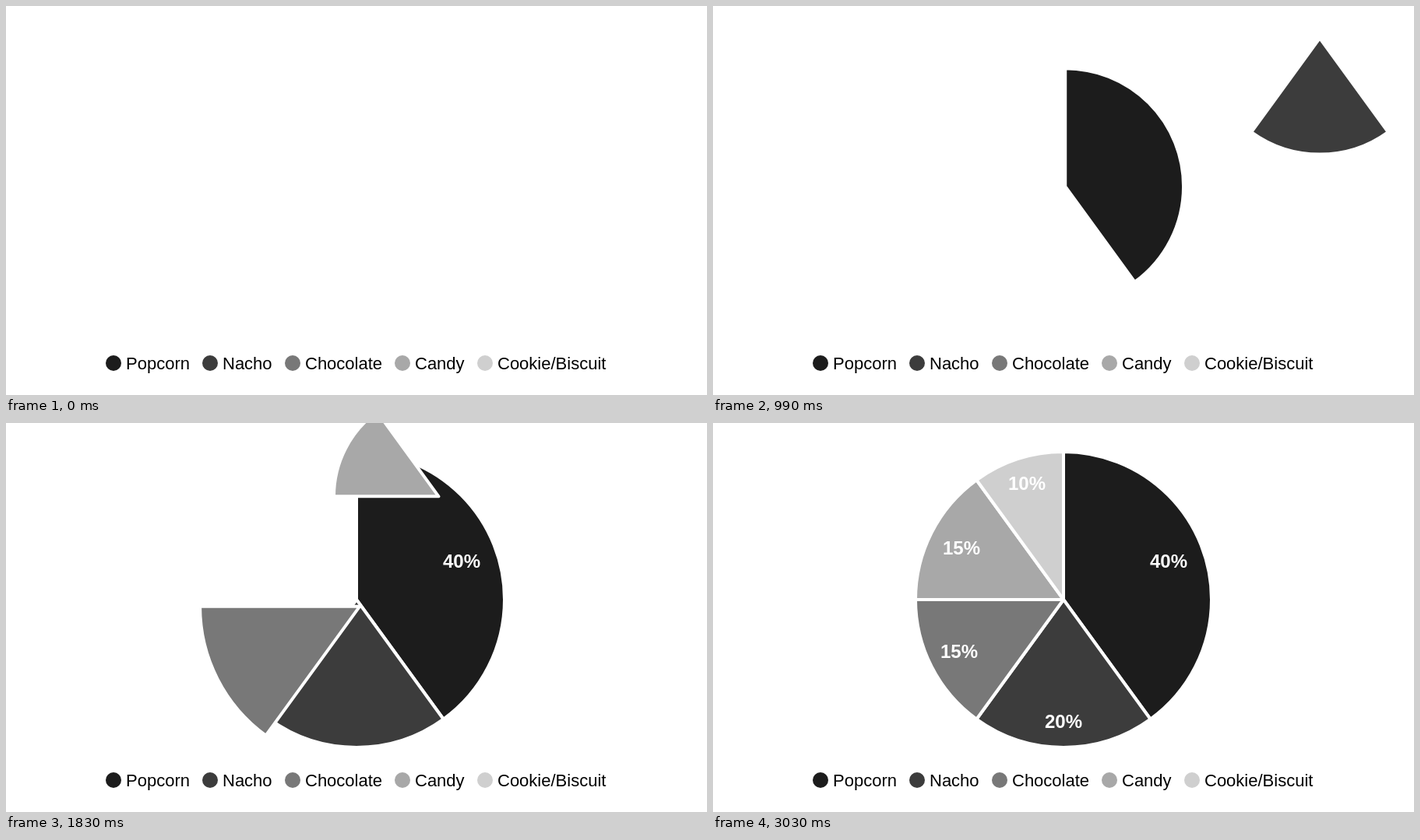
An HTML page with a canvas that plays this animation: 900 px wide and 500 px high, repeating every 5670 ms.

```html
<!DOCTYPE html>
<html lang="en">
<head>
<meta charset="utf-8">
<title>Snack shares</title>
<style>
  html, body { margin: 0; width: 100%; height: 100%; overflow: hidden; background: #fff; }
  canvas { display: block; width: 900px; height: 500px; }
</style>
</head>
<body>
<canvas id="stage" width="900" height="500"></canvas>
<script>
const ctx = document.getElementById('stage').getContext('2d');
const LOOP = 5670, STEP = 30;
const CX = 450, CY = 227, RADIUS = 190;
const FIRST = 570, STAGGER = 345;
const FLIGHT = 420, DIP_AT = 300, SETTLE = 180;
const FONT = '"Liberation Sans", Arial, sans-serif';

// peak: ms after entry when a slice is largest; top: its scale then
const slices = [
  { name: 'Popcorn', share: 40, color: '#1c1c1c', peak: 820, top: 1, label: { x: 585, y: 177, at: 1320 } },
  { name: 'Nacho', share: 20, color: '#3c3c3c', peak: 735, top: 1.1, label: { x: 450, y: 383, at: 1890 } },
  { name: 'Chocolate', share: 15, color: '#787878', peak: 620, top: 1.1, label: { x: 316, y: 293, at: 2040 } },
  { name: 'Candy', share: 15, color: '#a8a8a8', peak: 565, top: 1.1, label: { x: 319, y: 160, at: 2300 } },
  { name: 'Cookie/Biscuit', share: 10, color: '#cfcfcf', peak: 680, top: 1.1, label: { x: 403, y: 77, at: 2490 } }
];

let turn = 0;
slices.forEach((s, i) => {
  s.start = FIRST + i * STAGGER;
  s.dip = 0.77 - 0.0085 * i * i;
  s.from = turn * Math.PI / 50 - Math.PI / 2;
  turn += s.share;
  s.to = turn * Math.PI / 50 - Math.PI / 2;
});

const clamp = p => Math.min(1, Math.max(0, p));

// Cosine ease from a to b while t runs from t0 to t1
function ease(a, b, t, t0, t1) {
  const p = clamp((t - t0) / (t1 - t0));
  return a + (b - a) * (1 - Math.cos(Math.PI * p)) / 2;
}

// A curved dive from the top right, with a small overshoot on arrival
function tip(age) {
  const far = (1 - clamp(age / FLIGHT) ** 1.4) ** 2.55;
  const over = Math.sin(Math.PI * clamp((age - 380) / 270));
  return [
    CX + 418 * far + 5 * over,
    CY - 186 * (1 - (1 - far) ** 4.3) + 11 * over
  ];
}

function zoom(s, age) {
  if (age < DIP_AT) return ease(0.79, s.dip, age, 0, DIP_AT);
  if (age < s.peak) return ease(s.dip, s.top, age, DIP_AT, s.peak);
  return ease(s.top, 1, age, s.peak, s.peak + SETTLE);
}

function drawSlice(s, t) {
  const age = t - s.start;
  if (age < 0) return;
  const [x, y] = tip(age);
  ctx.beginPath();
  ctx.moveTo(x, y);
  ctx.arc(x, y, RADIUS * zoom(s, age), s.from, s.to);
  ctx.closePath();
  ctx.fillStyle = s.color;
  ctx.fill();
  ctx.strokeStyle = '#fff';
  ctx.lineWidth = 4;
  ctx.lineJoin = 'round';
  ctx.stroke();
}

function drawLabel(s, t) {
  const age = t - s.label.at;
  if (age <= 0) return;
  const k = age < 150 ? ease(0, 1.1, age, 0, 150) : ease(1.1, 1, age, 150, 540);
  ctx.save();
  ctx.translate(s.label.x, s.label.y);
  ctx.scale(k, k);
  ctx.font = 'bold 24px ' + FONT;
  ctx.textAlign = 'center';
  ctx.fillStyle = '#fff';
  ctx.fillText(s.share + '%', 0, 8.6);
  ctx.restore();
}

function drawLegend() {
  let x = 128;
  ctx.font = '22px ' + FONT;
  ctx.textAlign = 'left';
  for (const s of slices) {
    ctx.fillStyle = s.color;
    ctx.beginPath();
    ctx.arc(x + 10, 459, 10, 0, 2 * Math.PI);
    ctx.fill();
    ctx.fillStyle = '#000';
    ctx.fillText(s.name, x + 26, 467);
    x += 42 + Math.round(ctx.measureText(s.name).width);
  }
}

function draw(t) {
  ctx.fillStyle = '#fff';
  ctx.fillRect(0, 0, 900, 500);
  drawLegend();
  for (const s of slices) drawSlice(s, t);
  for (const s of slices) drawLabel(s, t);
}

const began = performance.now();
function tick() {
  const t = (performance.now() - began) % LOOP;
  draw(Math.floor(t / STEP) * STEP);
  requestAnimationFrame(tick);
}
tick();
</script>
</body>
</html>
```
